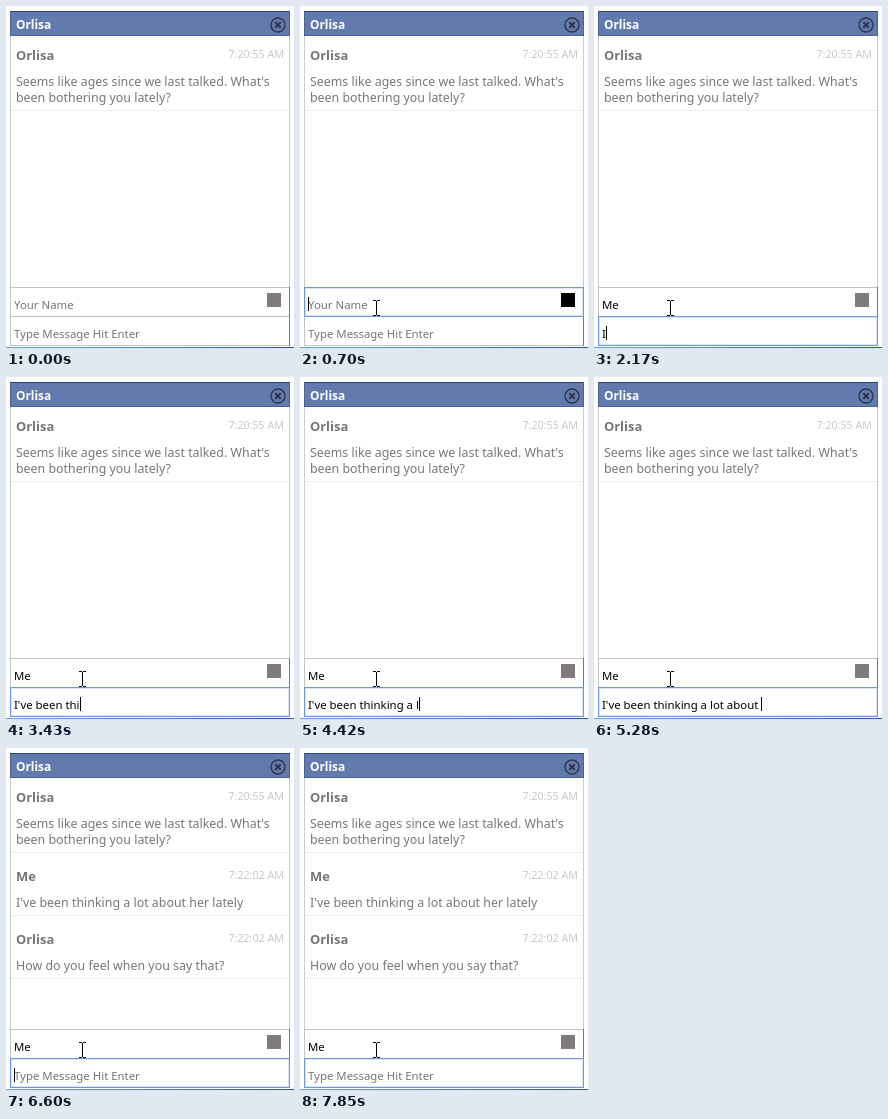
Recreate the animation shown at these times as an HTML page with a canvas. Size 288 px wide and 343 px high, loop 8000 ms.

```html
<!DOCTYPE html>
<html lang="en">
<head>
<meta charset="utf-8">
<title>Chat</title>
<style>
html, body { margin: 0; width: 288px; height: 343px; overflow: hidden; background: #fff; }
canvas { display: block; width: 288px; height: 343px; }
</style>
</head>
<body>
<canvas id="stage"></canvas>
<script>
const W = 288, H = 343, LOOP = 8000;
const BOT = 'Orlisa';
const LINE = "I've been thinking a lot about her lately";
const FAMILY = '"Noto Sans", "Open Sans", sans-serif';
const FONT = {
  title: `bold 11.9px ${FAMILY}`,
  name: `bold 12.9px ${FAMILY}`,
  body: `12.4px ${FAMILY}`,
  time: `10.7px ${FAMILY}`,
  input: `11.4px ${FAMILY}`
};

// [time, letters typed]
const TYPING = [[2170, 1], [3190, 10], [3260, 11], [3430, 13], [4270, 21], [4420, 22],
  [5280, 31], [5360, 32], [5430, 34], [5530, 35], [6000, 41]];
// [time, x, y] of the pointer centre
const POINTER = [[70, 83, 335], [150, 81, 325], [230, 79, 315], [300, 77, 306], [380, 76, 302]];
const T = { hover: 300, focus: 700, blink: 1160, m: 1390, e: 1550, tab: 1770,
  sent: 6380, reply: 6460, off: 6850, on: 7400, end: 7850 };

const canvas = document.getElementById('stage');
const ratio = window.devicePixelRatio || 1;
canvas.width = Math.round(W * ratio);
canvas.height = Math.round(H * ratio);
const c = canvas.getContext('2d');
c.scale(ratio, ratio);

function rect(x, y, w, h, color) {
  c.fillStyle = color;
  c.fillRect(x, y, w, h);
}

function text(str, x, y, font, color, align = 'left') {
  c.font = font;
  c.fillStyle = color;
  c.textAlign = align;
  c.fillText(str, x, y);
}

function frame(x, y, w, h, color) {
  c.strokeStyle = color;
  c.lineWidth = 1;
  c.strokeRect(x + 0.5, y + 0.5, w - 1, h - 1);
}

function lettersAt(t) {
  if (t < TYPING[0][0]) return 0;
  for (let i = 1; i < TYPING.length; i++) {
    const [t0, n0] = TYPING[i - 1], [t1, n1] = TYPING[i];
    if (t < t1) return Math.floor(n0 + (n1 - n0) * (t - t0) / (t1 - t0) + 1e-6);
  }
  return LINE.length;
}

function message(name, time, lines, y, rule) {
  text(name, 10, y, FONT.name, '#777672');
  text(time, 278, y - 2, FONT.time, '#c9c9c9', 'right');
  lines.forEach((line, i) => text(line, 10, y + 26 + 16 * i, FONT.body, '#777'));
  rect(5, rule, 278, 1, '#eee');
}

function header() {
  rect(4, 5, 280, 25, '#627aad');
  frame(4, 5, 280, 25, '#4a6193');
  rect(4, 5, 280, 1, '#29447e');
  text(BOT, 10, 23, FONT.title, '#fff');
  c.strokeStyle = '#2d364c';
  c.lineWidth = 1.4;
  c.beginPath();
  c.arc(272, 19, 7, 0, Math.PI * 2);
  c.stroke();
  c.lineWidth = 2;
  c.beginPath();
  c.moveTo(269.3, 16.3); c.lineTo(274.7, 21.7);
  c.moveTo(274.7, 16.3); c.lineTo(269.3, 21.7);
  c.stroke();
}

function field(y, h, value, hint, focused, caret) {
  rect(4, y, 280, h, '#fff');
  if (focused) {
    frame(4, y, 280, h, '#6b96e0');
    frame(5, y + 1, 278, h - 2, '#dbe6fa');
  } else {
    frame(4, y, 280, h, '#c4c4c4');
    rect(283, y, 1, h, '#777');
  }
  const base = y + 22;
  text(value || hint, 8, base, FONT.input, value ? '#000' : '#757575');
  if (caret) {
    const x = value ? 8 + Math.round(c.measureText(value).width) : 8;
    rect(x, base - 12, 1, 14, '#000');
  }
}

function pointer(t) {
  if (t < POINTER[0][0]) return;
  const [, x, y] = POINTER.filter(p => p[0] <= t).pop();
  rect(x, y - 7, 1, 14, '#000');
  for (const end of [y - 8, y + 7]) {
    rect(x - 3, end, 3, 1, '#000');
    rect(x + 1, end, 3, 1, '#000');
  }
}

function draw(t) {
  rect(0, 0, W, H, '#fff');
  rect(4, 30, 1, 252, '#ccc');
  rect(283, 30, 1, 252, '#ccc');
  header();

  message(BOT, '7:20:55 AM',
    ["Seems like ages since we last talked. What's", 'been bothering you lately?'], 54, 104);
  if (t >= T.sent) message('Me', '7:22:02 AM', [LINE], 133, 167);
  if (t >= T.reply) message(BOT, '7:22:02 AM', ['How do you feel when you say that?'], 196, 230);

  const onName = t >= T.focus && t < T.tab;
  const onText = t >= T.tab;
  const name = t >= T.e ? 'Me' : t >= T.m ? 'M' : '';
  const typed = t < T.sent ? LINE.slice(0, lettersAt(t)) : '';
  const nameCaret = onName && !(t >= T.blink && t < T.m);
  const textCaret = onText && (t < T.off || (t >= T.on && t < T.end));

  field(310, 30, typed, 'Type Message Hit Enter', onText, textCaret);
  field(281, 30, name, 'Your Name', onName, nameCaret);
  if (onText) rect(4, 310, 280, 1, '#6b96e0');
  rect(261, 287, 14, 14, t >= T.hover && t < T.tab ? '#000' : '#7f7b7b');

  const edge = c.createLinearGradient(0, 0, W, 0);
  edge.addColorStop(0, '#6fa3da');
  edge.addColorStop(0.6, '#4b7fbd');
  edge.addColorStop(1, '#2f5c86');
  rect(0, 341, W, 1, edge);
  rect(0, 342, W, 1, '#d5e4f2');
  pointer(t);
}

const start = performance.now();
function tick() {
  draw((performance.now() - start) % LOOP);
  requestAnimationFrame(tick);
}
tick();
</script>
</body>
</html>
```
